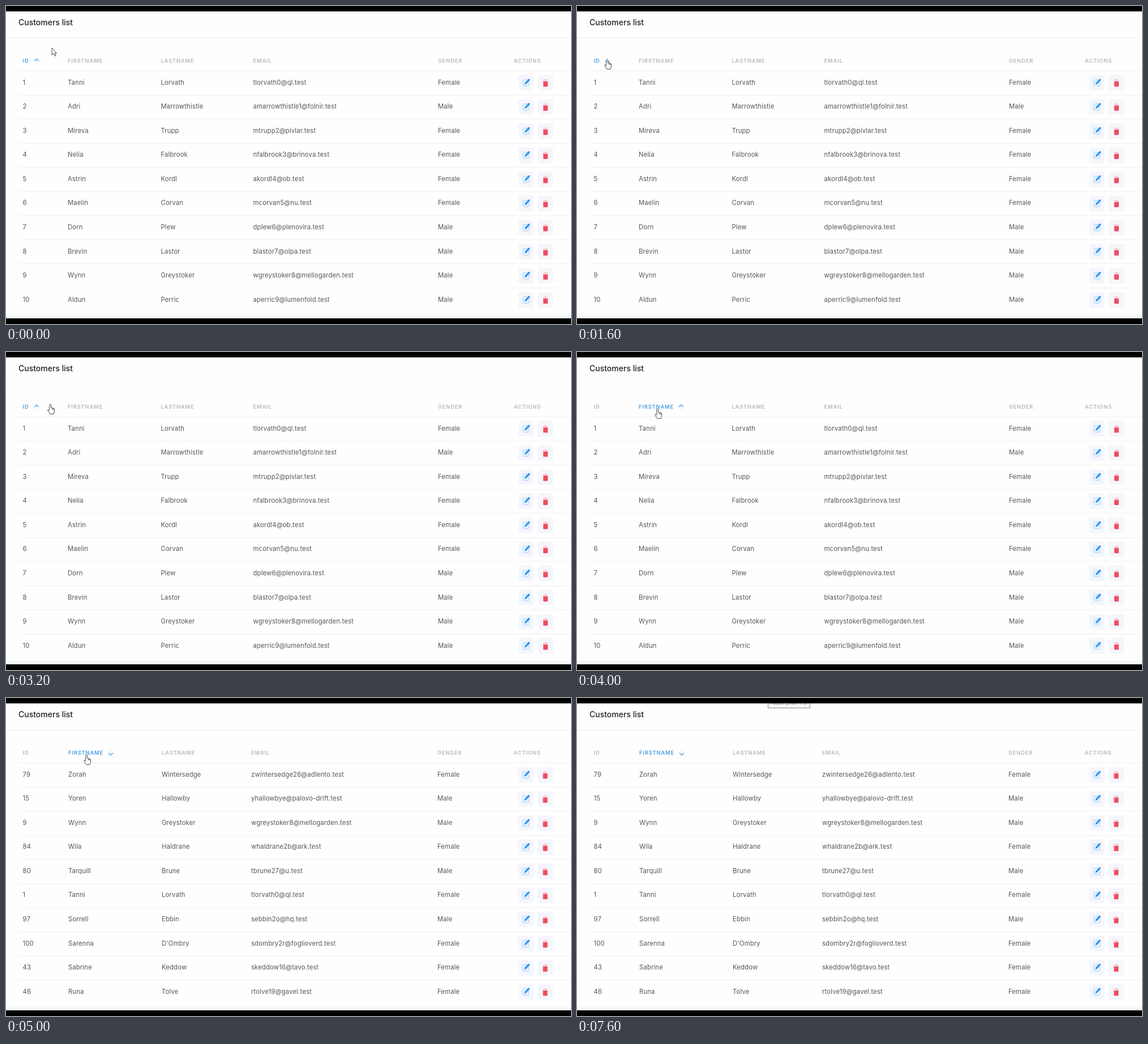
Animation of 998 by 561 pixels, one loop 8 s. Source, as an HTML page:

```html
<!DOCTYPE html>
<html lang="en">
<head>
<meta charset="utf-8">
<title>Customers list</title>
<style>
  html, body { margin: 0; width: 100%; height: 100%; overflow: hidden; background: #fefefe; }
  svg { display: block; width: 998px; height: 561px; }
  text { font: 400 11.3px Inter, sans-serif; letter-spacing: .15px; fill: #56565d; white-space: pre; }
  .title { font-weight: 500; font-size: 14px; letter-spacing: 0; fill: #202028; }
  .head { font-weight: 600; font-size: 9.3px; letter-spacing: .85px; fill: #b7b7c1; }
  .head.active { fill: #4b9fe4; }
  .tip { font: 8.6px "Noto Sans", sans-serif; letter-spacing: 0; fill: #666; }
  .chevron { fill: none; stroke: #3f9cec; stroke-width: 1.2; }
  .stem { stroke: #c3dff7; stroke-width: 1.2; }
  .pointer { fill: #fff; stroke: #33333a; stroke-width: .9; stroke-linejoin: round; }
</style>
</head>
<body>
<svg viewBox="0 0 998 561">
  <defs>
    <g id="actions">
      <rect width="27" height="27" rx="4" fill="#f5f6fc"/>
      <rect x="34.5" width="27" height="27" rx="4" fill="#f5f6fc"/>
      <rect x="8" y="8" width="11" height="11.5" rx="1.5" fill="#e6f3fe" stroke="#a9d5f8"/>
      <path d="M11 16.5l.8-3.3 6-6.3q1.2-.9 2.2 0t.2 2.2l-6 6.3z" fill="#2f94ea"/>
      <path d="M43.5 9.3h9M46.5 7.8h3" stroke="#f9bcc4" stroke-width="1.4"/>
      <path d="M44 11h8v8.5q0 .8-.8.8h-6.4q-.8 0-.8-.8z" fill="#ef4c61"/>
    </g>
  </defs>
  <rect width="998" height="561" fill="#fefefe"/>
  <rect y="543.5" width="998" height="8" fill="#f6f8fb"/>
  <path d="M0 56.5H998" stroke="#efeff1"/>
  <text class="title" x="22" y="33.5">Customers list</text>
  <g id="table"></g>
  <g id="tooltip">
    <rect x="337.5" y="-2" width="74" height="19.5" fill="#fdfdfd" stroke="#85858a"/>
    <text class="tip" x="341" y="12">Pause (Shift+F9)</text>
  </g>
  <g id="cursor">
    <path id="arrow" class="pointer" d="M0 0V12.5L3 9.8 5 14.3 7 13.4 5.1 9H8.5Z"/>
    <path id="hand" class="pointer" d="M-1.2 10V1.5a1.4 1.4 0 0 1 2.8 0V6.3l4.7 1.2q1.6.5 1.4 2.2l-.6 4.3-1.1 3.4H-.2L-4 11.4q-.7-1.5.7-1.8 1 0 2.1 1.6zM4 7v3M6 7.6v2.6"/>
  </g>
  <path d="M0 0H998V9.6H0zM0 551H998V561H0z"/>
</svg>
<script>
const LOOP = 8000, STEP = 200;
const $ = id => document.getElementById(id);

// id, first name, last name, gender, mail domain
const people = Object.fromEntries(`
1 Tanni Lorvath F ql
2 Adri Marrowthistle M folnir
3 Mireva Trupp F pivlar
4 Nelia Falbrook F brinova
5 Astrin Kordl F ob
6 Maelin Corvan F nu
7 Dorn Plew M plenovira
8 Brevin Lastor M olpa
9 Wynn Greystoker M mellogarden
10 Aldun Perric M lumenfold
15 Yoren Hallowby M palovo-drift
22 Barro Tenly M ven
43 Sabrine Keddow F tavo
46 Runa Tolve F gavel
54 Alva Bozzarin F gorvella
57 Andrel Winterbrooken M trandot
60 Bexia Thistlebrook F dorl
62 Aylmer Gossen M voxhollowair
69 Arvo Dunscorme M notelow
79 Zorah Wintersedge F adlento
80 Tarquill Brune M u
84 Wila Haldrane F ark
90 Avril Thornsey F stavry
91 Lorrin Vask M brintel
92 Ottila Brance F quorva
93 Perrin Saldow M delm
94 Ilsa Wendrake F orvanta
95 Corrin Malvey M tibelo
96 Nadra Pellworth F luvo
97 Sorrell Ebbin M hq
98 Hadley Frusk M senwick
99 Marla Tendrove F calvero
100 Sarenna D'Ombry F foglioverd`.trim().split('\n').map(line => {
  const [id, first, last, gender, domain] = line.split(' ');
  const user = (first[0] + last).toLowerCase().replace("'", '');
  return [id, [id, first, last, `${user}${(id - 1).toString(36)}@${domain}.test`,
    gender === 'F' ? 'Female' : 'Male']];
}));

const headings = ['ID', 'FIRSTNAME', 'LASTNAME', 'EMAIL', 'GENDER', 'ACTIONS'];
const range = (start, dir) => Array.from({ length: 10 }, (_, i) => start + i * dir);
const pages = {
  idUp: { ids: range(1, 1), columns: [29.5, 109, 273.5, 436.5, 763, 897] },
  idDown: { ids: range(100, -1), columns: [29.5, 111, 277, 440, 767, 900] },
  nameUp: { ids: [2, 10, 54, 57, 69, 5, 90, 62, 22, 60],
    columns: [29.5, 110.5, 276, 441.5, 760, 895.5] },
  nameDown: { ids: [79, 15, 9, 84, 80, 1, 97, 100, 43, 46],
    columns: [29.5, 110, 275, 433, 762, 896.5] }
};

// a click turns the sort arrow at once; the rows follow when they are loaded
const sorts = [[0, 0, 1], [1400, 0, -1], [2600, 0, 1], [3800, 1, 1], [4600, 1, -1]];
const loads = [[0, 'idUp'], [1800, 'idDown'], [3200, 'idUp'], [4400, 'nameUp'], [5000, 'nameDown']];

// time, x, y of the pointer tip
const path = [[0, 81, 74], [1000, 53, 94], [3000, 53, 94], [3200, 78, 92],
  [3800, 142, 100], [5800, 142, 100], [6500, 375, -30], [LOOP, 375, -30]];

const latest = (list, t) => list.findLast(([start]) => start <= t);

function sortArrow(x, dir) {
  const tip = dir > 0 ? 93 : 101;
  return `<path class="stem" d="M${x} 92.5V101"/>
    <path class="chevron" d="M${x - 4} ${tip + 4 * dir}L${x} ${tip}L${x + 4} ${tip + 4 * dir}"/>`;
}

function tableMarkup({ ids, columns }, active, dir) {
  const head = headings.map((label, i) =>
    `<text class="head${i === active ? ' active' : ''}" x="${columns[i]}" y="99.8">${label}</text>`);
  const rows = ids.map((id, i) => {
    const y = 114 + 42.55 * i;
    const cells = people[id].map((value, c) => `<text x="${columns[c]}" y="${y + 24.7}">${value}</text>`);
    return `<path d="M22 ${Math.round(y) + .5}H998" stroke="#f0f0f2"/>${cells.join('')}
      <use href="#actions" x="${columns[5] + 8}" y="${y + 8}"/>`;
  });
  return head.join('') + sortArrow(columns[active] + (active ? 75 : 24.5), dir) + rows.join('');
}

function pointerAt(t) {
  const i = path.findIndex(key => key[0] > t);
  const [t0, x0, y0] = path[i - 1], [t1, x1, y1] = path[i];
  const p = (t - t0) / (t1 - t0), e = p * p * (3 - 2 * p);
  return [x0 + (x1 - x0) * e, y0 + (y1 - y0) * e];
}

let shown;
function draw(now) {
  const t = Math.floor(now % LOOP / STEP) * STEP;
  if (t === shown) return;
  shown = t;

  const [, active, dir] = latest(sorts, t);
  $('table').innerHTML = tableMarkup(pages[latest(loads, t)[1]], active, dir);

  const [x, y] = pointerAt(t);
  const overHeading = y > 80;
  $('cursor').setAttribute('transform', `translate(${x} ${y})`);
  $('hand').style.display = overHeading ? '' : 'none';
  $('arrow').style.display = overHeading ? 'none' : '';
  $('tooltip').style.opacity = t < 7400 ? 0 : t < 7600 ? .5 : 1;
}

const start = performance.now();
function tick() {
  draw(performance.now() - start);
  requestAnimationFrame(tick);
}
tick();
</script>
</body>
</html>
```
